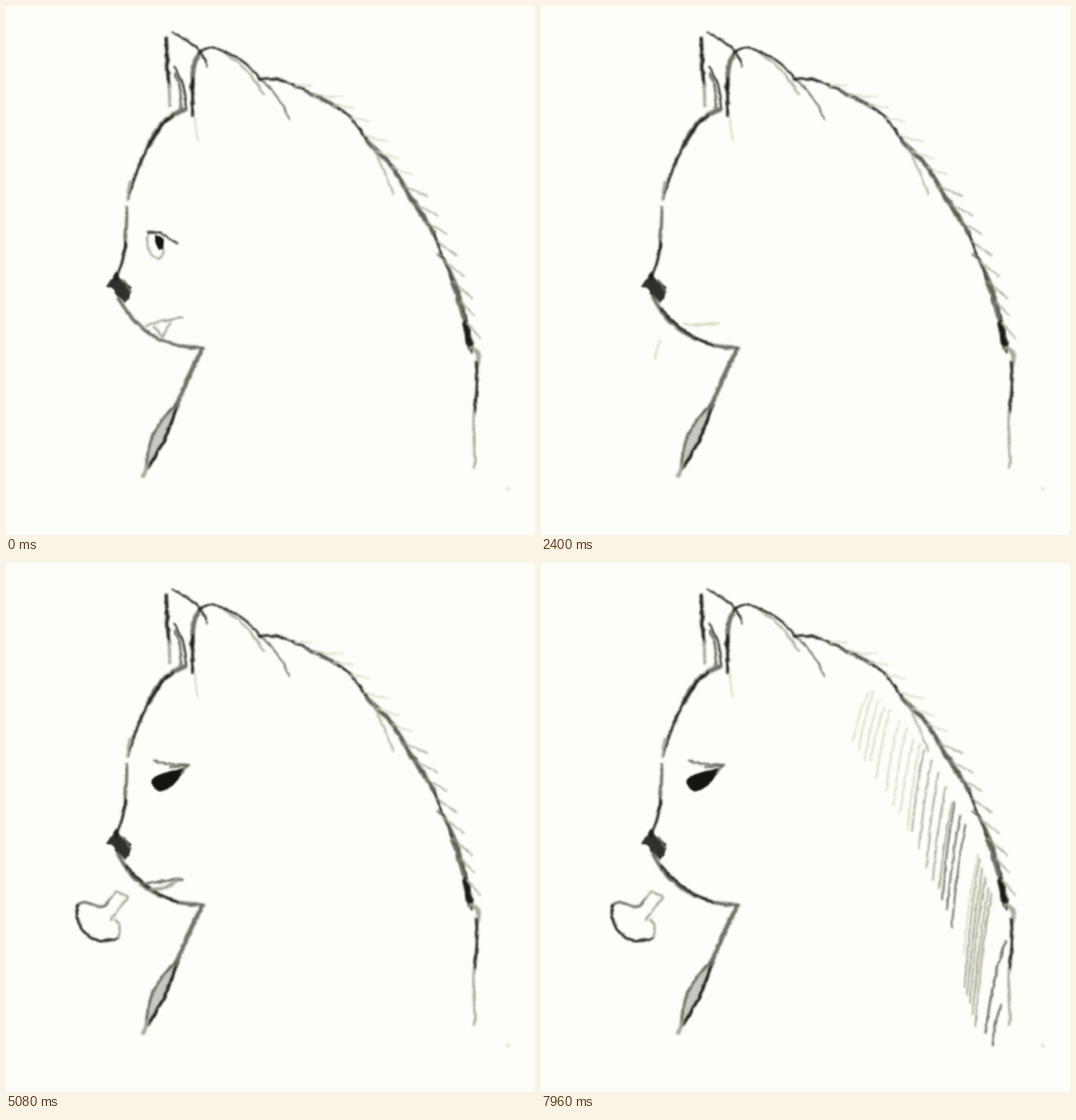
Recreate the animation shown at these times as an HTML page. Size 720 by 720 pixels, loop 8 s.

```html
<!DOCTYPE html>
<html lang="en">
<head>
<meta charset="utf-8">
<title>Pencil sketch</title>
<style>
  html, body { margin: 0; width: 100%; height: 100%; overflow: hidden; background: #fdfdfa; }
  svg { display: block; width: 100vw; height: 100vh; }
  path { stroke-linecap: round; stroke-linejoin: round; }
</style>
</head>
<body>
<svg id="stage" viewBox="0 0 720 720">
  <filter id="pencil" x="0" y="0" width="720" height="720" filterUnits="userSpaceOnUse" color-interpolation-filters="sRGB">
    <feTurbulence type="fractalNoise" baseFrequency="0.09" numOctaves="2" seed="4"/>
    <feDisplacementMap in="SourceGraphic" scale="4" xChannelSelector="R" yChannelSelector="G"/>
    <feGaussianBlur stdDeviation="0.9"/>
  </filter>
</svg>
<script>
const LOOP = 8000;
const DARK = '#141410', GREY = '#65655a', LIGHT = '#a2a290', PALE = '#dadac0';
const ALWAYS = [-2, -1];
const stage = document.getElementById('stage');
const animated = [];

function add(parent, tag, attrs) {
  const node = document.createElementNS('http://www.w3.org/2000/svg', tag);
  for (const key in attrs) node.setAttribute(key, attrs[key]);
  return parent.appendChild(node);
}
const still = add(stage, 'g', { filter: 'url(#pencil)' });
const moving = add(stage, 'g', { filter: 'url(#pencil)' });

// span: [draw start, draw end, erase start, erase end] in ms
function line(d, width, color, span) {
  const pen = (w, opacity) => add(span ? moving : still, 'path',
    { d, fill: 'none', stroke: color, 'stroke-width': w, opacity, pathLength: 1 });
  const nodes = [pen(width + 3, 0.22), pen(width, 0.88)];
  if (span) nodes.forEach(node => animated.push({ node, span }));
  return nodes[1];
}
function blot(d, color, opacity, span) {
  const node = add(span ? moving : still, 'path', { d, fill: color, 'fill-opacity': opacity });
  if (span) animated.push({ node, span, fade: true });
}

let seed = 7;
function random() {
  seed = (seed * 16807) % 2147483647;
  return seed / 2147483647;
}
const jitter = amount => (random() - 0.5) * 2 * amount;
const mix = (a, b, t) => a + (b - a) * t;

// Ears
line('M218 44C220 70 219 90 222 109', 4, DARK);
line('M222 107L223 136', 3.5, LIGHT);
line('M226 36C247 45 268 58 273 81', 2, DARK);
line('M229 82C238 98 247 116 244 138', 2, DARK);
line('M230 92C240 112 238 126 238 138', 3, GREY);
line('M264 62C252 80 255 98 253 112', 5.5, GREY);
line('M254 100L254 149', 3.5, DARK);
line('M257 148C257 160 259 172 262 182', 2, PALE);
line('M263 64C273 54 284 56 298 63C320 71 333 82 345 99', 2.5, DARK);
line('M300 66C320 76 336 100 352 119', 2, LIGHT);
line('M345 99C362 113 378 132 385 155', 1.8, GREY);

// Back, with hairs that turn downwards along it
const back = line('M345 100C375 93 405 115 440 132C470 146 480 165 492 184' +
  'C507 203 522 208 535 233C550 262 570 285 584 314C596 346 612 380 625 420L634 470', 2.8, DARK);
line('M408 116C425 123 438 131 451 136', 3.5, GREY);
line('M492 184C507 203 522 208 535 233C550 262 566 282 581 308', 5.5, GREY);
line('M498 186L527 256', 1.6, LIGHT);
line('M588 338C600 345 610 369 619 398', 3, GREY);
line('M609 378C619 408 626 430 632 465', 6, GREY);
line('M625 432L632 462', 7.5, DARK);
line('M632 465C642 466 647 476 641 492', 4, LIGHT);
line('M640 485C643 510 640 530 638 552', 3, DARK);
line('M637 552C634 580 639 606 638 629', 2.5, LIGHT);
const backLength = back.getTotalLength();
const HAIRS = 15;
for (let i = 0; i < HAIRS; i++) {
  const t = i / (HAIRS - 1);
  const { x, y } = back.getPointAtLength(mix(0.1, 0.92, t) * backLength);
  const angle = mix(0, 0.85, t), length = 30 + jitter(8);
  line(`M${x} ${y}l${length * Math.cos(angle)} ${length * Math.sin(angle)}`, 1.5, t < 0.5 ? PALE : LIGHT);
}

// Forehead and nose
line('M243 141C219 150 203 168 195 190', 6, GREY);
line('M226 150C208 164 202 176 195 190C181 214 172 240 167 262', 2.6, DARK);
line('M169 240L165 263', 4, LIGHT);
line('M164 274C166 300 161 320 161 338', 3.5, GREY);
line('M162 322C161 346 155 358 149 372', 3, DARK);
blot('M136 381L150 361L157 374L171 382L168 397L162 405L150 393L146 384Z', DARK, 0.88);
line('M159 374L170 388', 3, GREY);

// Neck
line('M266 468C250 500 241 520 232 545', 5.5, GREY);
blot('M232 543C206 565 191 594 191 630C208 607 223 582 232 543Z', GREY, 0.35);
line('M232 543C206 565 191 594 191 630C208 607 223 582 232 543', 3, GREY);
line('M231 550C221 583 207 608 194 628', 3, DARK);
line('M193 624L187 640', 4, LIGHT);
line('M683 656L684 657', 3, PALE);

// First eye
const firstEye = [...ALWAYS, 60, 450];
line('M196 308C187 325 196 340 208 344C214 340 215 334 214 328', 2.2, LIGHT, firstEye);
line('M194 309L209 308C218 314 225 318 233 323', 2, DARK, firstEye);
blot('M203 311L216 318L215 330L208 332L203 322Z', DARK, 1, firstEye);

// Second eye
line('M201 289C215 286 228 286 240 290', 2.5, DARK, [480, 700, 1250, 1500]);
blot('M222 289L237 289L248 299L230 320L224 308Z', DARK, 0.95, [650, 950, 1350, 1600]);
line('M213 326C222 324 227 320 231 315', 2.2, LIGHT, [920, 1100, 1450, 1650]);

// Early chin and its replacement
const earlyChin = [...ALWAYS, 1600, 1950];
line('M153 398C166 420 184 443 211 455C232 462 252 466 269 466', 4, GREY, earlyChin);
line('M190 436C205 427 221 429 239 424', 2.5, LIGHT, earlyChin);
line('M224 431L213 451L202 437', 2.5, LIGHT, earlyChin);
line('M153 396C163 420 185 442 210 453C232 462 252 466 269 466', 4.5, GREY, [1900, 2250]);
line('M164 412C181 434 204 452 233 461', 2.5, DARK, [2000, 2300]);
line('M195 433C212 435 226 433 241 432', 3, PALE, [1950, 2150, 4300, 4500]);

// Final eye
blot('M198 298C203 286 224 283 242 280C238 295 221 311 209 311C200 308 198 304 198 298Z', DARK, 1, [2550, 2950]);
line('M202 269C216 277 232 272 249 275', 2.5, GREY, [2850, 3060]);
line('M224 278L247 276L239 286', 2.5, GREY, [3000, 3220]);

// Cup-shaped outline in front of the chin
line('M162 457C157 465 157 472 155 481', 2, PALE, [2320, 2390, 3420, 3500]);
line('M97 469C100 457 113 463 128 468C138 468 138 461 142 457', 2.8, GREY, [3480, 3680]);
line('M97 466C94 483 101 497 109 505C122 517 139 516 152 510', 3, DARK, [3650, 3920]);
line('M152 510C157 499 154 489 149 486', 3, LIGHT, [3900, 4000]);
line('M142 457L150 447L166 455C159 465 149 474 143 486', 2.2, LIGHT, [3980, 4180]);

// Mouth
line('M183 437C202 436 219 430 240 431', 3, GREY, [4450, 4700, 7600, 7920]);
line('M198 444C214 445 226 439 231 432', 4, LIGHT, [4700, 5000, 7600, 7920]);

// Mane: strands hang from one curve to another; u runs from crown to shoulder
const curve = (a, b, c, u) => mix(mix(a, b, u), mix(b, c, u), u);
function mane(from, to, count, color, start, end, drop = 0) {
  const step = (end - start) / count;
  for (let i = 0; i < count; i++) {
    const u = mix(from, to, i / (count - 1));
    const x = curve(445, 555, 632, u), y = curve(175, 250, 515, u) + jitter(7);
    const tipX = curve(424, 544, 607, u), tipY = curve(240, 400, 640, u) + drop + jitter(7);
    line(`M${x} ${y}Q${mix(x, tipX, 0.6)} ${mix(y, tipY, 0.4)} ${tipX} ${tipY}`, 1.8, color,
      [start + i * step, start + (i + 1) * step]);
  }
}
mane(0, 0.14, 5, PALE, 5150, 5450);
mane(0.2, 0.34, 4, PALE, 5450, 5700);
mane(0.37, 0.57, 5, LIGHT, 5700, 6000);
mane(0.59, 0.67, 3, GREY, 6000, 6200);
mane(0.77, 0.88, 3, PALE, 6200, 6350);
mane(0.78, 0.88, 5, LIGHT, 6750, 7500, 40);
line('M632 515C616 562 610 600 605 640', 2.5, GREY, [6350, 6440]);
line('M627 602C618 620 617 638 615 656', 2.5, GREY, [6440, 6500]);

const ramp = (t, a, b) => Math.min(1, Math.max(0, (t - a) / (b - a)));

function render(t) {
  for (const { node, span, fade } of animated) {
    const [drawStart, drawEnd, eraseStart = LOOP, eraseEnd = LOOP + 1] = span;
    const drawn = ramp(t, drawStart, drawEnd), erased = ramp(t, eraseStart, eraseEnd);
    node.style.display = drawn > erased ? '' : 'none';
    if (fade) {
      node.style.opacity = drawn - erased;
    } else {
      node.style.strokeDasharray = `${drawn - erased} 2`;
      node.style.strokeDashoffset = -erased;
    }
  }
}

const started = performance.now();
function tick() {
  render((performance.now() - started) % LOOP);
  requestAnimationFrame(tick);
}
tick();
</script>
</body>
</html>
```
